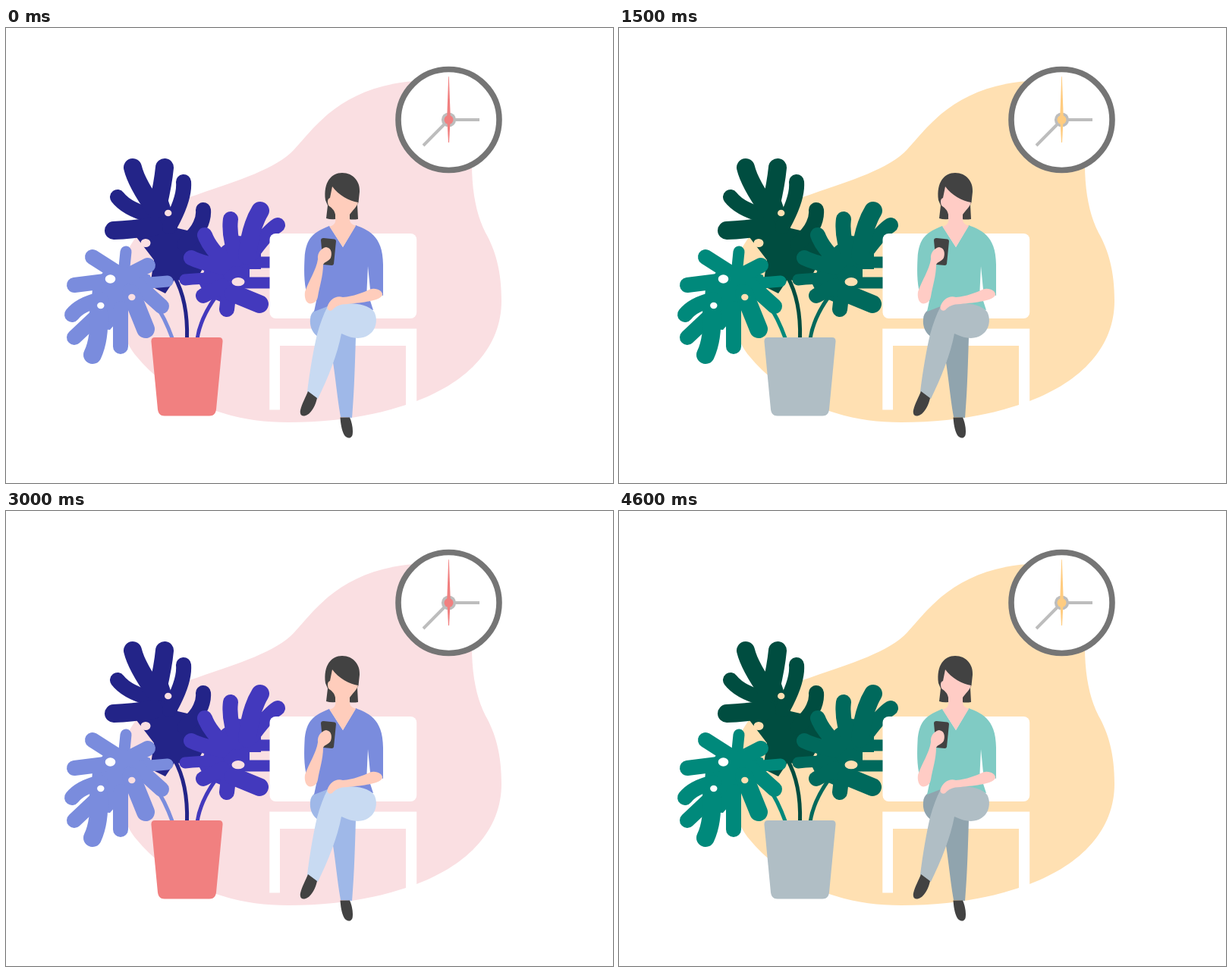
An HTML page that plays this animation: 800 by 600 pixels, repeating every 4.8 s.

```html
<!DOCTYPE html>
<html lang="en">
<head>
<meta charset="utf-8">
<title>Waiting room</title>
<style>
  html, body { margin: 0; width: 100%; height: 100%; overflow: hidden; background: #fff; }
  svg { display: block; width: 100vw; height: 100vh; }
  .blob { fill: var(--blob); }
  .accent { fill: var(--accent); }
  .pot { fill: var(--pot); }
  .shirt { fill: var(--shirt); }
  .skin { fill: var(--skin); }
  .front { fill: var(--front); }
  .back { fill: var(--back); }
  .white { fill: #fff; }
  .black { fill: #424242; }
  .hand { fill: none; stroke: #bdbdbd; stroke-width: 4; }
  .dark { color: var(--dark); }
  .mid { color: var(--mid); }
  .light { color: var(--light); }
  .body { fill: currentColor; }
  .lobe, .stem { fill: none; stroke: currentColor; stroke-linecap: round; }
  .lobe { stroke-width: 20; }
  .lobe.thin { stroke-width: 15; }
  .lobe.wide { stroke-width: 24; }
  .stem { stroke-width: 5; }
</style>
</head>
<body>
<svg id="scene" viewBox="0 0 800 600">
  <path class="blob" d="M560 70C500 68 455 88 425 113C403 132 393 146 380 160C355 187 300 203 245 222C190 241 148 290 147 345C146 390 158 416 172 433C195 461 235 492 280 506C310 516 340 520 372 520C435 520 490 511 541 492C610 466 653 420 653 360C653 320 645 293 632 270C620 247 614 215 614 180V100Z"/>

  <g id="clock">
    <circle cx="583.5" cy="121" r="66.5" fill="#fff" stroke="#757575" stroke-width="7.6"/>
    <path class="hand" d="M624 121H583.5L550 155"/>
    <circle cx="583.5" cy="121" r="9.6" fill="#bdbdbd"/>
    <path class="accent" d="M583.2 64H583.8L585.8 118L584 151H583L581.2 118Z"/>
    <circle class="accent" cx="583.5" cy="121" r="6"/>
  </g>

  <!-- Each leaf is a body with round-tipped lobes fanning out of it. -->
  <g id="plant">
    <g class="dark">
      <path class="stem" d="M222 328Q240 360 238.5 410"/>
      <path class="body" d="M190 232L212 222L226 264L252 270L268 300L250 335L222 332L210 350L190 340L195 306L172 276V260Z"/>
      <path class="lobe" d="M234 203Q236 225 215 262M260 240Q262 262 235 285M147 223Q160 240 195 248"/>
      <path class="lobe wide" d="M167 184Q172 205 197 240M209 184Q207 205 200 235M142 267Q165 266 195 262"/>
      <ellipse class="blob" cx="184" cy="283.5" rx="6.5" ry="5.5"/>
      <ellipse class="blob" cx="213.7" cy="244" rx="4.7" ry="4.3"/>
    </g>
    <g class="mid">
      <path class="stem" d="M276 355Q256 383 252 410"/>
      <path class="body" d="M285 288L305 274L330 276L336 290V318H321V340L308 344V362H285L262 352L255 338L262 318L272 306Z"/>
      <path class="lobe thin" d="M236 332Q255 330 280 330M352 309H315M352 336H315"/>
      <path class="lobe" d="M262 273Q268 290 290 310M358 260Q345 268 322 300M296 252Q293 275 305 305M244 303Q258 310 285 315M291 371L294 345M260 353L285 340"/>
      <path class="lobe wide" d="M335 241Q322 262 318 300M334 364L300 350"/>
      <ellipse class="blob" cx="306" cy="334.7" rx="8.5" ry="5.6"/>
    </g>
    <g class="light">
      <path class="stem" d="M196 363Q209 381 219.5 410"/>
      <path class="body" d="M128 322L155 312L190 326L192 340L178 352L158 374L137 398L112 396V376L114 342Z"/>
      <path class="lobe thin" d="M158 295L155 325M213 334L165 338"/>
      <path class="lobe" d="M187 313L150 332M90 408L125 375M205 367L175 340M151 420V370M90 339L130 334M114 302L150 325M87 378Q98 364 125 358"/>
      <path class="lobe wide" d="M184 397L165 350M114 431Q124 410 122 375"/>
      <ellipse class="white" cx="137.5" cy="331" rx="6.8" ry="5.7"/>
      <ellipse class="white" cx="124.8" cy="366" rx="4.7" ry="4.2"/>
      <ellipse class="blob" cx="165.8" cy="355" rx="4.7" ry="4.2"/>
    </g>
    <path class="pot" d="M196 408H281Q286 408 285.5 414L277 503Q276 511.5 268 511.5H209Q201 511.5 200 503L191.5 414Q191 408 196 408Z"/>
  </g>

  <g id="bench" class="white">
    <rect x="347.5" y="271" width="193.7" height="112" rx="8"/>
    <path d="M347.3 396.5H541.2V504H527V419H361V503.5H347.3Z"/>
  </g>

  <g id="woman">
    <path class="back" d="M426 364C410 368 401 374 401 384C400 394 404 402 411 407ZM441 400L461 407C460 440 459 480 456 514L441 513C437 490 434 460 431 441Z"/>
    <path class="shirt" d="M426 261L444 289L461 260C475 266 497 272 497 312V353L480 345L477 314L475.5 346L484 372C465 368 440 364 424 367L406 374L410 355L397 352C392 335 393 315 393.5 304C395 275 407 269 426 261Z"/>
    <path class="front" d="M424 367C445 360 476 362 485 374C492 386 487 408 464 409C455 409 447 405 442 403C437 430 425 460 411 489L397 480C400 455 405 425 410 404C414 390 418 378 424 367Z"/>
    <path class="skin" d="M480 344.5C488 342 497 347 496 352C493 360 470 362 450 364C440 364 434 367 430 372C426 374 422 371 424 366C427 358 435 352 444 355C458 354 470 349 480 344.5Z"/>
    <path class="black" d="M398 479L410 488C408 498 402 509 395 511C389 513 387 509 388 504C390 495 395 487 398 479ZM440.5 513.5H453C456 520 458 530 456.5 537C454 542.5 449 541 446 537C442 530 441 520 440.5 513.5Z"/>
    <path class="black" d="M421 227C418 203 429 191 443 191C458 191 467 203 466 216L464.5 230L463 233L464 252Q457 253 452 252L434 252Q428 253 422 251L424 234Z"/>
    <path class="skin" d="M430 209C438 220 452 228 464 230C462 237 456 241 453 246V252C453 258 457 259 461 261L444 289L426.5 262C433 260 435 256 434 251V246C433 240 429 237 425 234C423 229 424 225 427 224Z"/>
    <path class="black" d="M418.5 277L433 278.5Q435 279 435 281L432 311Q431.5 313 429.5 313L418 312L415 280Q415 277 418.5 277Z"/>
    <path class="skin" d="M411 305C410 296 416 290 422 289C429 290 430 297 428 303C425 308 420 308 418 312C418 327 413 341 411 354C410 360 406 363.5 401 363.5C395 363 393 355 394 348C399 333 409 319 411 305Z"/>
  </g>
</svg>
<script>
  const pink = {
    "--blob": "#fadfe2", "--accent": "#f18080", "--pot": "#f18080",
    "--dark": "#232488", "--mid": "#4339bd", "--light": "#7a8cdd",
    "--shirt": "#7a8cdd", "--skin": "#ffcdbc", "--front": "#c8daf2", "--back": "#9fb8e8"
  };
  const green = {
    "--blob": "#ffe0b2", "--accent": "#ffcc80", "--pot": "#b0bec5",
    "--dark": "#004d40", "--mid": "#00695c", "--light": "#00897b",
    "--shirt": "#80cbc4", "--skin": "#ffccc5", "--front": "#b0bec5", "--back": "#90a4ae"
  };

  // The two palettes alternate: slowly at first, then faster.
  const hold = (time, count) => Array(count).fill(time);
  const holds = [...hold(500, 6), ...hold(200, 2), ...hold(300, 2), ...hold(200, 4)];
  const duration = holds.reduce((sum, time) => sum + time);

  let start = 0;
  const steps = holds.map((time, i) => {
    const step = { ...(i % 2 ? green : pink), offset: start / duration, easing: "step-end" };
    start += time;
    return step;
  });
  steps.push({ ...green, offset: 1 });
  document.getElementById("scene").animate(steps, { duration, iterations: Infinity });
</script>
</body>
</html>
```
